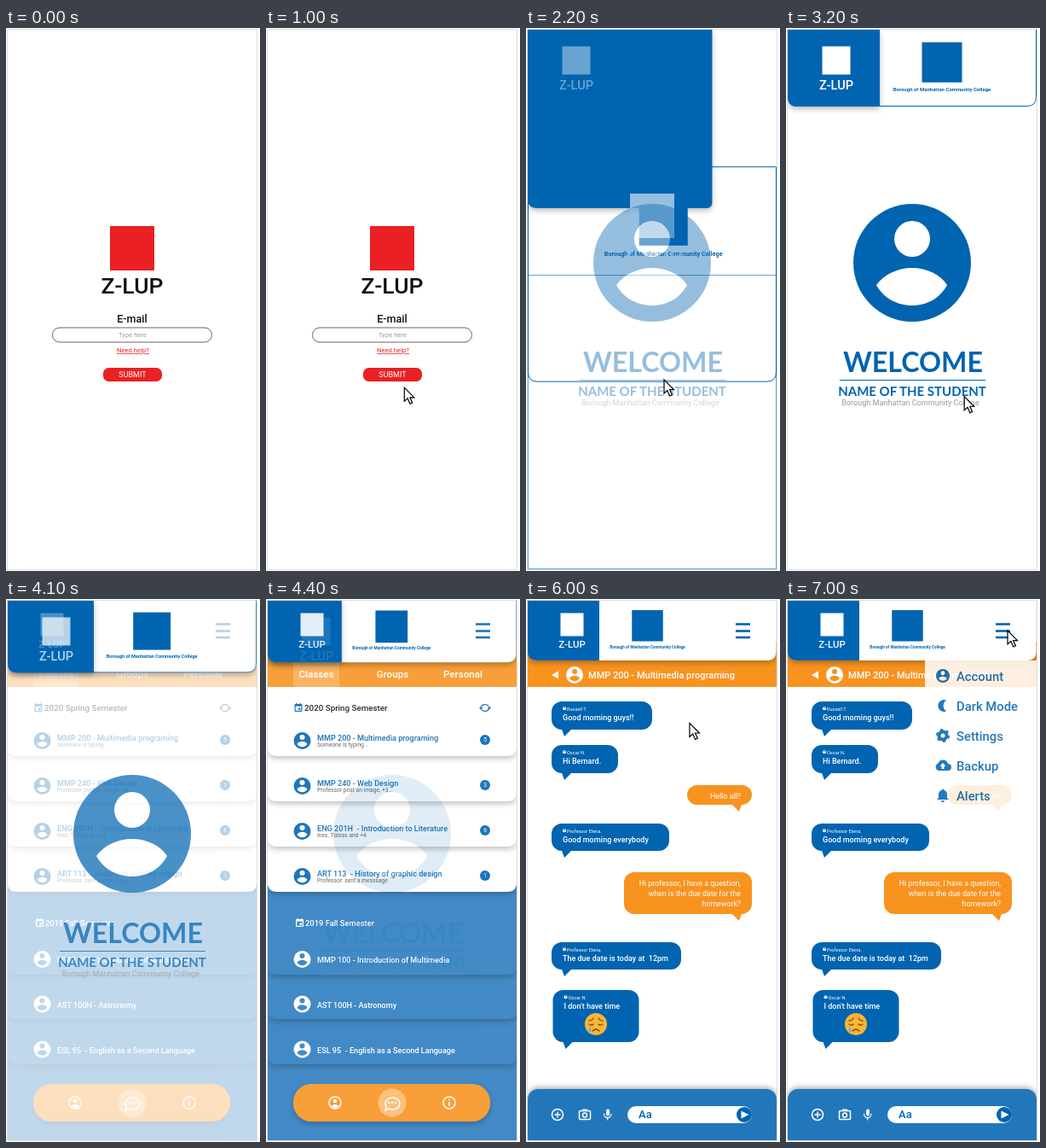
An HTML page that plays this animation: 298x636 px, repeating every 7.1 s.

```html
<!DOCTYPE html>
<html lang="en">
<head>
<meta charset="utf-8">
<title>Class chat walkthrough</title>
<style>
html, body { margin: 0; width: 100%; height: 100%; overflow: hidden; background: #fff; }
svg { display: block; font-family: Roboto, "Open Sans", sans-serif; }
text { white-space: pre; }
.shade { filter: drop-shadow(0 3px 3px #0004); }
.geo { font-family: Lato, Inter, sans-serif; font-weight: 700; }
</style>
</head>
<body>
<svg width="298" height="636" viewBox="0 0 298 636">
  <clipPath id="page"><rect x="2" y="1" width="292.5" height="633"/></clipPath>
  <rect width="298" height="636" fill="#fff"/>
  <g clip-path="url(#page)">
    <g id="login"></g>
    <g id="list"></g>
    <g id="header"></g>
    <g id="welcome"></g>
    <g id="chat"></g>
  </g>
  <rect x="1.5" y="1.5" width="293" height="633" fill="none" stroke="#ddd"/>
  <path id="cursor" d="M0 0V16L3.8 12.6 6.6 19 9.4 17.8 6.6 11.6H11.5Z" fill="#fff" stroke="#000" stroke-width="1.2"/>
</svg>
<script>
const BLUE = '#0064b1', SOFT = '#2a7bbf', BAR = '#2277bb', ORANGE = '#f8931f', RED = '#ea2024';
const LOOP = 7100, STEP = 100, WIDTH = 292;
const BRAND = 'Z-LUP';
const el = id => document.getElementById(id);

// ---------- drawing helpers ----------
const text = (x, y, size, str, fill, more = '') =>
  `<text x="${x}" y="${y}" font-size="${size}" fill="${fill}" ${more}>${str}</text>`;
const mid = ' text-anchor="middle"', end = ' text-anchor="end"', bold = ' font-weight="500"';
const rect = (x, y, w, h, r, fill, more = '') =>
  `<rect x="${x}" y="${y}" width="${w}" height="${h}" rx="${r}" fill="${fill}" ${more}/>`;
const circle = (x, y, r, fill, more = '') => `<circle cx="${x}" cy="${y}" r="${r}" fill="${fill}" ${more}/>`;
const path = (d, fill, more = '') => `<path d="${d}" fill="${fill}" ${more}/>`;
const outline = (color, width) => `stroke="${color}" stroke-width="${width}"`;
const line = (d, color, width) => path(d, 'none', outline(color, width) + ' stroke-linecap="round"');
const at = (x, y, body, scale = 1) => `<g transform="translate(${x} ${y}) scale(${scale})">${body}</g>`;
const fade = (alpha, body) => `<g opacity="${alpha}">${body}</g>`;

// Box with rounded bottom corners: left radius l, right radius r
const drop = (x, y, w, h, l = 11, r = l) =>
  `M${x} ${y}h${w}v${h - r}q0 ${r} ${-r} ${r}h${l + r - w}q${-l} 0 ${-l} ${-l}z`;

const avatar = (x, y, r, fg, bg) => at(x, y,
  circle(0, 0, 69, fg) + circle(0, -28, 21, bg) +
  path('M-42 26C-33 13-16 6 0 6S33 13 41 26C33 41 18 50 0 50S-34 41-42 26Z', bg), r / 69);

const brand = (x, y, size, font, gap, color, ink = color) =>
  rect(x - size / 2, y - size / 2, size, size, 0, color) + text(x, y + gap, font, BRAND, ink, mid + bold);

const calendar = (x, y, color, hole) =>
  rect(x, y + 1, 9, 9, 1, color) + rect(x + 1.2, y + 3.6, 6.6, 5.2, 0, hole) +
  rect(x + 1.5, y, 1.3, 2, 0, color) + rect(x + 6.2, y, 1.3, 2, 0, color) + rect(x + 4.5, y + 5.5, 2.4, 2.4, 0, color);

// ---------- login ----------
el('login').innerHTML =
  `<g id="mark">${brand(148, 258, 52, 26.5, 53, RED, '#111')}</g>` +
  text(148, 345, 12.6, 'E-mail', '#111', mid + bold) +
  rect(54.5, 351, 187, 17, 8.5, '#fff', outline('#666', 1)) +
  text(148.5, 362.3, 7.6, 'Type here', '#999', mid) +
  text(149, 380, 7.7, 'Need help?', RED, mid + ' text-decoration="underline"') +
  rect(114, 398, 69, 16, 6.5, RED) + text(148.5, 409.3, 9, 'SUBMIT', '#fff', mid);

// ---------- header, shared by every later screen ----------
const mix = (a, b, k) => a + (b - a) * k;

function header(shown, shrink, compact) {
  const to = (a, b, c) => mix(mix(a, b, shrink), c, compact);
  const top = to(275, 1.5, 1.5), left = 1 - compact;
  const college =
    rect(-32, -78, 64, 64, 0, BLUE) +
    text(0, 0, 8.15, 'Borough of Manhattan Community College', BLUE, mid + ' font-weight="700"');
  return fade(shown,
    path(drop(2.5, top, 291, to(639, 91.5, 72) - top), '#fff',
      `stroke="${BLUE}" stroke-opacity="${left}"` + (compact ? ' class="shade"' : '')) +
    rect(2.5, 289.5, 291, 344, 0, 'none', `stroke="${BLUE}" stroke-opacity="${1 - shrink}"`) +
    path(drop(2, 1, to(292, 108, 84), to(293, 91, 71), 11, 11 * (1 - shrink)), BLUE,
      compact < 1 ? 'class="shade"' : '') +
    at(to(146, 183, 142.5), to(402, 74, 57.5), college, to(1, .735, .57)) +
    fade(1 - shrink, brand(148, 220, 52, 26.5, 56, '#fff')) +
    fade(shrink * left, brand(59, 38, 33, 14.6, 34, '#fff')) +
    fade(compact, brand(54, 30, 27, 11.4, 27, '#fff') +
      [29.5, 37.5, 45].map(y => rect(246, y - 1.3, 17, 2.6, 0, BLUE)).join('')));
}

// ---------- welcome ----------
el('welcome').innerHTML =
  avatar(148, 275, 69, BLUE, '#fff') +
  text(149, 403, 32.2, 'WELCOME', BLUE, mid + ' class="geo"') +
  rect(63, 412, 171, 1, 0, BLUE) +
  text(148, 431, 15, 'NAME OF THE STUDENT', BLUE, mid + ' class="geo"') +
  text(146, 442, 9.1, 'Borough Manhattan Community College', '#999', mid);

// ---------- class list ----------
const classes = [
  ['MMP 200 - Multimedia programing', 'Someone is typing...', 5],
  ['MMP 240 - Web Design', 'Professor post an image, +3...', 3],
  ['ENG 201H  - Introduction to Literature', 'Ines. Tobias and +4', 6],
  ['ART 113  - History of graphic design', 'Professor: sent a messsage', 1]
];
const past = [
  ['MMP 100 - Introduction of Multimedia', 422],
  ['AST 100H - Astronomy', 474.5],
  ['ESL 95  - English as a Second Language', 527.5]
];
const card = (bottom, fill) => path(drop(2, 80, 292, bottom - 80), fill, 'class="shade"');

el('list').innerHTML =
  rect(0, 0, 298, 636, 0, SOFT) +
  [545, 492, 440].map(y => card(y, SOFT)).join('') +
  [343, 290, 237, 184].map(y => card(y, '#fff')).join('') +
  rect(2, 50, 292, 53, 0, ORANGE) + rect(32, 72, 54, 31, 0, '#fff', 'opacity=".22"') +
  [[59, 'Classes'], [148.5, 'Groups'], [231, 'Personal']]
    .map(([x, s]) => text(x, 92, 11.6, s, '#fff', mid + bold)).join('') +
  calendar(33.5, 122, BLUE, '#fff') + text(45, 131, 9.8, '2020 Spring Semester', '#111', bold) +
  line('M252 128a5 4.6 0 0 1 8.6-3M262 127a5 4.6 0 0 1-8.6 3', BLUE, 1.3) +
  path('M250 127h4.4l-2.2 2.8zM259.8 128.2h4.4l-2.2-2.8z', BLUE) +
  classes.map(([name, note, count], i) => at(0, i * 53,
    avatar(42.5, 166, 10, BLUE, '#fff') +
    text(60, 166, 9.1, name, BLUE, bold) + text(60, 173, 6.7, note, '#555') +
    circle(257, 165, 6, BLUE) + text(257, 167.4, 6.5, count, '#fff', mid))).join('') +
  calendar(35, 374, '#fff', SOFT) + text(46, 382.5, 9.4, '2019 Fall Semester', '#fff', bold) +
  past.map(([name, y]) => avatar(42.5, y, 10, '#fff', SOFT) + text(60, y + 4, 9.1, name, '#fff', bold)).join('') +
  rect(32, 568, 231, 44, 21, ORANGE, 'class="shade"') +
  circle(81, 590, 7, 'none', outline('#fff', 1.5)) + circle(81, 588, 2.3, '#fff') +
  path('M76.5 594q4.5-4 9 0-4.5 4-9 0z', '#fff') +
  circle(148, 590, 16.5, '#fff', 'opacity=".35"') +
  line('M144 597l-4 2 1-4.5a8.5 7 0 1 1 3 2.5a12 8 0 0 0 6 1', '#fff', 1.4) +
  [144, 148, 152].map(x => circle(x, 590, 1.3, '#fff')).join('') +
  circle(215, 590, 7, 'none', outline('#fff', 1.5)) +
  rect(214.2, 589, 1.6, 5, 0, '#fff') + circle(215, 586.6, 1, '#fff');

// ---------- chat ----------
function bubble(x, y, w, h, name, words) {
  return rect(x, y, w, h, 12, BLUE) + path(`M${x + 11} ${y + h - 3}l4 11 11-11z`, BLUE) +
    circle(x + 15, y + 8.3, 2, '#fff') + circle(x + 15, y + 7.7, .7, BLUE) +
    text(x + 18, y + 10.5, 5.6, name, '#fff') + text(x + 13, y + 21.5, 9, words, '#fff', bold);
}
function reply(x, y, w, h, lines) {
  return rect(x, y, w, h, 12, ORANGE) + path(`M${x + w - 11} ${y + h - 3}l-4 11-11-11z`, ORANGE) +
    lines.map((s, i) => text(252, y + 15.5 + i * 12.2, 8.8, s, '#fff', end)).join('');
}
const sadFace = circle(0, 0, 13, '#fbb534') +
  line('M-8-4q3 0 5-3M8-4q-3 0-5-3M-8 0q3 2 5 0M8 0q-3 2-5 0M-4 8q4-4 8 0', '#7a4a12', 1.3) +
  path('M-7 3q-3 5 0 6 3-1 0-6z', '#5bb5ea');

const glyphs = [
  avatar(0, 0, 8, BLUE, '#fff'),
  path('M4-6.5A7 7 0 1 0 4 6.5 8 8 0 0 1 4-6.5Z', BLUE),
  circle(0, 0, 4.5, 'none', outline(BLUE, 4)) +
    circle(0, 0, 7, 'none', outline(BLUE, 2) + ' stroke-dasharray="3.67"'),
  path('M-5 6a4.5 4.5 0 0 1-.5-8.5A6 6 0 0 1 6-2 4 4 0 0 1 6 6z', BLUE) + path('M0-3l3.5 4h-2v3h-3v-3h-2z', '#fff'),
  path('M-7 5l2-2v-4a5 5 0 0 1 3.5-5 1.5 1.5 0 0 1 3 0A5 5 0 0 1 5-1v4l2 2zM-2 6h4a2 2 0 0 1-4 0z', BLUE)
];
const menu = rect(163, 72, 131, 182, 0, '#fff') +
  ['Account', 'Dark Mode', 'Settings', 'Backup', 'Alerts'].map((s, i) =>
    at(184, 90 + i * 35, glyphs[i]) + text(200, 95.5 + i * 35, 14.8, s, BLUE, bold)).join('');

el('chat').innerHTML =
  rect(2, 0, 296, 636, 0, '#fff', 'style="filter:drop-shadow(-2px 0 4px #0005)"') +
  rect(2, 50, 292, 53, 0, ORANGE) +
  path('M30 89l8-4.5v9z', '#fff') + avatar(57, 89, 10, '#fff', ORANGE) +
  text(73, 92.5, 11, 'MMP 200 - Multimedia programing', '#fff', bold) +
  bubble(30, 120, 118, 33, 'Russell T.', 'Good morning guys!!') +
  bubble(30, 171, 78, 33, 'Oscar N.', 'Hi Bernard.') +
  reply(189, 218, 76, 23, ['Hello all!!']) +
  bubble(30, 263, 138, 32, 'Professor Elena.', 'Good morning everybody') +
  reply(115, 320, 150, 49, ['Hi professor, I have a question,', 'when is the due date for the', 'homework?']) +
  bubble(30, 402, 152, 32, 'Professor Elena.', 'The due date is today at  12pm') +
  bubble(31.5, 458, 101, 61, 'Oscar N.', 'I don\'t have time') + at(82, 498, sadFace) +
  rect(2, 574, 292, 80, 12, BAR, 'style="filter:drop-shadow(0 -2px 3px #0005)"') +
  circle(37, 604, 6.5, 'none', outline('#fff', 1.5)) + line('M34 604h6M37 601v6', '#fff', 1.4) +
  rect(62.5, 599.5, 13, 10, 1, 'none', outline('#fff', 1.5)) +
  rect(66, 597.5, 6, 2.5, 0, '#fff') + circle(69, 604.5, 2.5, 'none', outline('#fff', 1.4)) +
  rect(94, 597.5, 4, 8, 2, '#fff') + line('M91.5 603a4.2 4.5 0 0 0 8.5 0M95.7 607.5v2.5', '#fff', 1.2) +
  rect(119, 594, 146, 20, 10, '#fff') + text(132, 608.3, 13, 'Aa', BLUE, bold) +
  circle(256, 604, 9, BLUE) + path('M252.5 599.5l9 4.5-9 4.5z', '#fff') +
  header(1, 1, 1) + `<g id="menu">${menu}</g>`;

// ---------- motion ----------
const clamp = k => Math.min(1, Math.max(0, k));
const ease = k => k * k * (3 - 2 * k);
const ramp = (t, start, span) => ease(clamp((t - start) / span));

// Pointer runs: time, x, y; it is hidden outside them
const runs = [
  [[400, 168, 578], [1100, 162, 412], [2600, 162, 412], [3250, 210, 432], [3900, 210, 432]],
  [[4600, 298, 300], [5000, 174, 174], [5750, 174, 174], [6600, 260, 37], [LOOP, 260, 37]]
];
function pointer(t) {
  const run = runs.find(r => t >= r[0][0] && t < r[r.length - 1][0]);
  if (!run) return null;
  const i = run.findIndex(p => p[0] > t);
  const [t0, x0, y0] = run[i - 1], [t1, x1, y1] = run[i];
  const k = ramp(t, t0, t1 - t0);
  return [mix(x0, x1, k), mix(y0, y1, k)];
}
const show = (id, alpha) => {
  el(id).setAttribute('opacity', alpha);
  el(id).style.display = alpha > 0 ? '' : 'none';
};
const shift = (id, x, y = 0) => el(id).setAttribute('transform', `translate(${x} ${y})`);

function draw(t) {
  const enter = ramp(t, 1150, 420), shrink = ramp(t, 1865, 761);
  const list = ramp(t, 3850, 700), slide = ramp(t, 5030, 700);
  show('login', enter < 1 ? 1 : 0);
  show('mark', 1 - enter);
  shift('mark', 0, -38 * enter);
  show('welcome', shrink * (1 - list));
  show('list', list);
  show('chat', slide > 0 ? 1 : 0);
  show('menu', clamp((t - 6850) / 175));
  el('header').innerHTML = header(enter, shrink, list);
  shift('list', -.3 * WIDTH * slide);
  shift('header', -.3 * WIDTH * slide);
  shift('chat', WIDTH * (1 - slide));
  const tip = pointer(t);
  show('cursor', tip ? 1 : 0);
  if (tip) shift('cursor', ...tip);
}

const begin = performance.now();
let last = -1;
function tick() {
  const t = Math.floor((performance.now() - begin) % LOOP / STEP) * STEP;
  if (t !== last) draw(last = t);
  requestAnimationFrame(tick);
}
tick();
</script>
</body>
</html>
```
